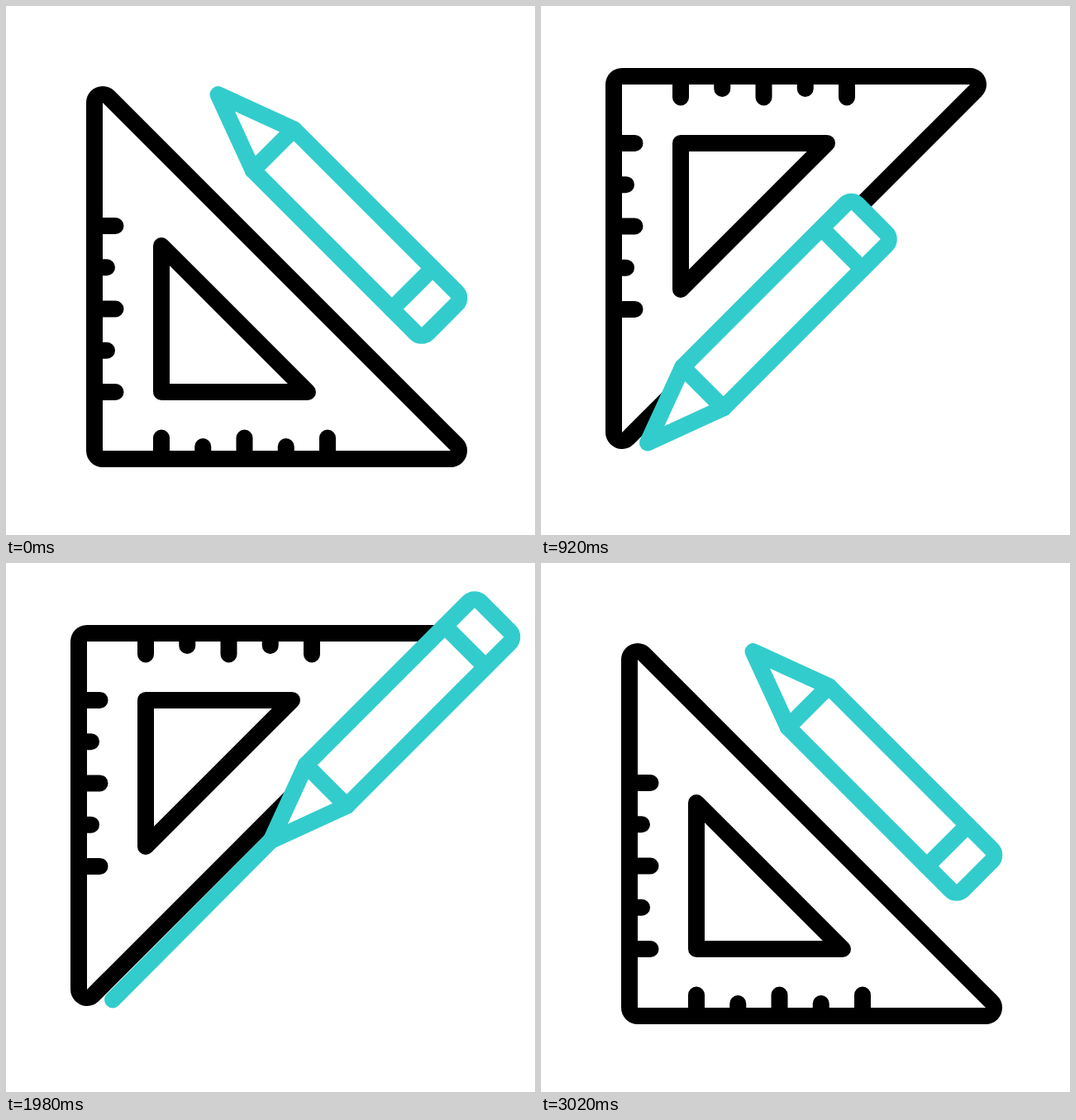
Animation of 640x640 px, one loop 3.22 s. Source, as an HTML page:

```html
<!DOCTYPE html>
<html lang="en">
<head>
<meta charset="utf-8">
<title>Set square and pencil</title>
<style>
  html, body { margin: 0; width: 100%; height: 100%; overflow: hidden; background: #fff; }
  svg { display: block; width: 100%; height: 100%; }
  g { fill: none; stroke-width: 20; stroke-linecap: round; stroke-linejoin: round; }
  #square { stroke: #000; }
  #pencil, #line { stroke: #33cccc; }
  #line { stroke-width: 20; stroke-linecap: round; }
  .frame { fill: #fff; stroke-width: 40; paint-order: stroke; }
  .body { fill: #fff; }
</style>
</head>
<body>
<svg viewBox="0 0 640 640">
  <!-- Set square, origin at the middle of its bounding box -->
  <g id="square">
    <path class="frame" d="M-210.5-210.5V210.5H210.5Z"/>
    <path d="M-139.5-37.5V139.5H37.5Z"/>
    <path id="ticks"/>
  </g>
  <line id="line"/>
  <!-- Pencil lying along x, tip at the origin -->
  <g id="pencil">
    <path class="body" d="M0 0L94.6-35H373.5a10 10 0 0 1 10 10V25a10 10 0 0 1-10 10H94.6Z"/>
    <path d="M94.6-35V35M332.3-35V35"/>
  </g>
</svg>
<script>
  const LOOP = 3220;
  const PENCIL_MIDDLE = 206;
  const SQUARE_REST = [327.5, 327.5], SQUARE_TURNED = [308.5, 305.4];
  const PENCIL_REST = [402.2, 252.7], PENCIL_START = [274.7, 382.8], PENCIL_END = [466.2, 190.3];
  const LINE_START = [129, 528.5], LINE_END = [320.5, 336];

  const [square, ticks, line, pencil] =
    ['square', 'ticks', 'line', 'pencil'].map(id => document.getElementById(id));

  let tickPath = '';
  for (let i = 0; i < 5; i++) {
    const along = 139.5 - 50.25 * i;
    const length = i % 2 ? 15 : 25.5;
    tickPath += `M-220.5 ${along}h${length}M${-along} 220.5v${-length}`;
  }
  ticks.setAttribute('d', tickPath);

  const ease = (t, from, to) => {
    const u = Math.min(1, Math.max(0, (t - from) / (to - from)));
    return u * u * (3 - 2 * u);
  };
  const mix = (a, b, k) => a.map((v, i) => v + (b[i] - v) * k);

  function render(t) {
    const turn = ease(t, 195, 903) - ease(t, 2241, 2986);
    const drawn = ease(t, 1245, 1953);
    const erased = ease(t, 2120, 2240);

    // The set square drifts along a slight curve while it turns
    const [x, y] = mix(SQUARE_REST, SQUARE_TURNED, turn);
    const bow = turn * (1 - turn);
    const sx = x + bow * (37 * turn - 26), sy = y + bow * (20 * turn - 4);
    square.setAttribute('transform', `translate(${sx} ${sy}) rotate(${90 * turn})`);

    const away = mix(PENCIL_START, PENCIL_END, drawn);
    const [px, py] = mix(PENCIL_REST, away, turn);
    pencil.setAttribute('transform',
      `translate(${px} ${py}) rotate(${45 - 90 * turn}) translate(${-PENCIL_MIDDLE} 0)`);

    const [x1, y1] = mix(LINE_START, LINE_END, erased);
    const [x2, y2] = mix(LINE_START, LINE_END, drawn);
    Object.entries({ x1, y1, x2, y2 }).forEach(([name, v]) => line.setAttribute(name, v));
    line.style.display = drawn > erased ? '' : 'none';
  }

  const begin = performance.now();
  function tick() {
    render((performance.now() - begin) % LOOP);
    requestAnimationFrame(tick);
  }
  tick();
</script>
</body>
</html>
```
